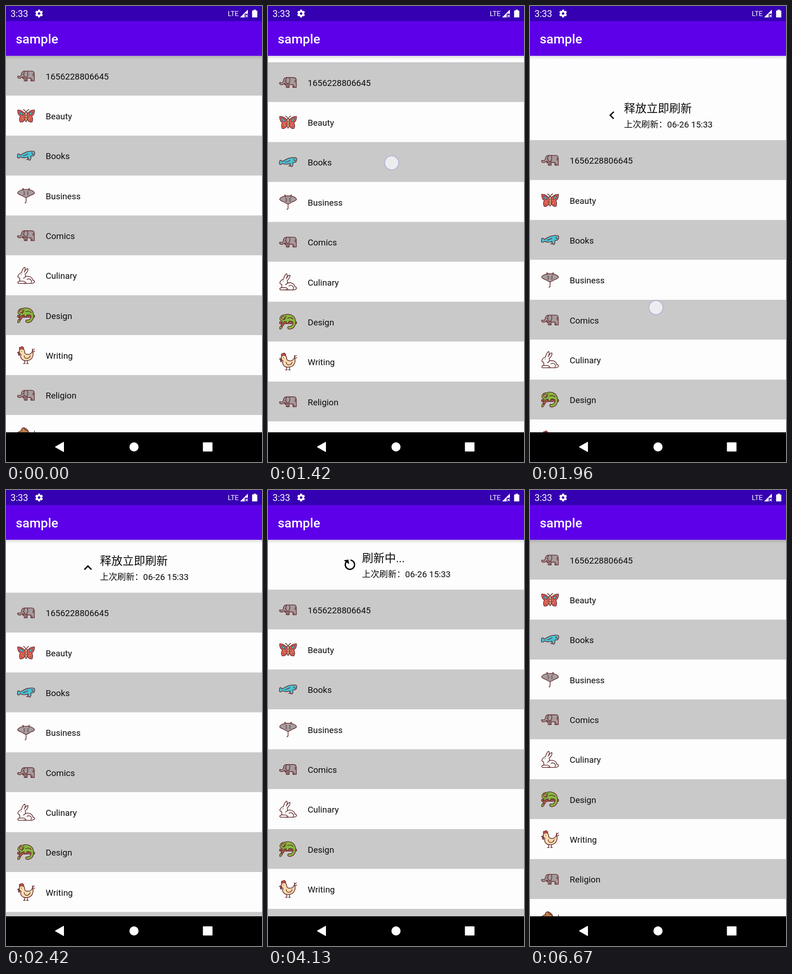
These frames come from a looping animation (561x998 px, 6.71 s). An HTML page:

```html
<!DOCTYPE html>
<html lang="zh-CN">
<head>
<meta charset="utf-8">
<title>sample</title>
<style>
  html, body { margin: 0; width: 100%; height: 100%; overflow: hidden; background: #fdfdfd; }
  svg { display: block; }
  text { font-family: Roboto, "Noto Sans CJK SC", "Noto Sans CJK", "Noto Sans CJK JP", sans-serif; fill: #0c0c0c; }
  .row, .sub { font-size: 18.93px; }
  .bar text { fill: #fff; }
  .pet { stroke: #6a3436; stroke-width: 1.6; stroke-linecap: round; stroke-linejoin: round; fill: none; }
</style>
</head>
<body>
<svg width="561" height="998" viewBox="0 0 561 998">
  <defs>
    <linearGradient id="shade" x2="0" y2="1">
      <stop stop-opacity=".13"/><stop offset="1" stop-opacity="0"/>
    </linearGradient>
    <g id="elephant" class="pet">
      <path fill="#a69b9e" d="M1.5 20.5c-1 5 5 5.500 8 3.500l2.500-2 1 2.500h3V31h6.500v-7c3 1.500 5 1.500 8 .5V31h7.500V16c0-4-2-6.500-6-6.500H17c-5 0-7 3-7.500 8-.3 3-3 4-5 3z"/>
      <path d="M17 10c-4 5-1 13 2 13 4 0 6-6 4-13M13 17v.5M33 31v-4M35.500 15v5M19.500 31v-7M14 22c-2 3-1 4 0 4"/>
    </g>
    <g id="butterfly" class="pet">
      <g id="wing">
        <path fill="#f0605a" d="M18.500 17C14 10 8 7 1.500 7.500c.5 6 1 11 6 13-2 4-2.500 9-.5 13 5 1 9-2 11.500-8z"/>
        <path fill="#43b6c6" stroke-width="1.100" d="M5.500 11c5 0 8 3 8.500 8-5 0-8-2-8.500-8z"/>
        <path fill="#f7a35c" stroke-width="1" d="M10 30c0-4 2-7 5-7.500-.5 4-2 6.500-5 7.500z"/>
        <path d="M19 12c-.5-3-2-5-5-5.500"/>
      </g>
      <use href="#wing" transform="matrix(-1 0 0 1 40 0)"/>
      <path fill="#fbdc9c" d="M18 14c0-3 4-3 4 0v12c0 3-1 6-2 7-1-1-2-4-2-7z"/>
      <path stroke-width="1" d="M18 19h4M18 24h4"/>
    </g>
    <g id="manatee" class="pet">
      <path fill="#46c3d4" d="M1.500 17c1-2 4-1 6 1.500 6-3 10-7 18-8 6-1 11-1.500 13 1 1 3 0 7-2 8.500-2 1-4 0-6 1 .5 4 0 8-2.500 9-3-1-4-4-4-7-6 2-12 2.500-16-.5-3 3-6 4-7 1 0-2 .5-4 .5-6.500z"/>
      <path d="M33 13v.5M36 17c-2 0-3-1-3-2.500M14 20c4-.5 7-2 10-4M24 23v5.500h-3"/>
    </g>
    <g id="ray" class="pet">
      <path d="M20 24v7c0 3 0 5-2.500 5"/>
      <path fill="#a69fa1" d="M13 4v3C8 8 3 10 1.500 14c1 4 8 4 11.500 7 3 2 5 3 7 3s4-1 7-3c3.500-3 10.500-3 11.500-7C37 10 32 8 27 7V4l-2 2.500H15z"/>
      <path d="M15 12h2M15 15h2M15 18h2M23 12h2M23 15h2M23 18h2M14 8.500v.5M26 8.500v.5"/>
    </g>
    <g id="rabbit" class="pet">
      <path fill="#fdfdfd" d="M10 14c1-6 4-11 7-12 2 3 1 7-1 11 2-4 5-8 8-8 1 4-2 9-6 12 1 3 1 5 0 6 7-3 16 0 17 8 4-1 5 5 1 5-1 1-2 1.500-4 1.500H4c-3 0-3-5 2-5 1-2 0-4 0-7-4-1-5-4-3-6 2-4 4-5 7-5.500z"/>
      <path d="M9 18v.5M18 23c-1 2-3 3-4 3M31 36c3-6-4-11-9-7M6 32.500h7c4 0 6 2 7 4.500h-5"/>
    </g>
    <g id="chameleon" class="pet">
      <path fill="#b95a42" d="M1.500 20h37v4H13c-3 2-4 5-6 7-3-1-3-4-1-7H1.500z"/>
      <path fill="#86bb3d" d="M2 13C3 8 7 4 12 5c9-4 22 0 24 11 2 10-2 19-12 20-6 0-6-5-2-6 6 1 9-3 9-9-3-3-6-3-9-2l-2 4h-4v-4l-5 1-2 3H6l1-5c-3 0-5-2-5-5z"/>
      <circle cx="9" cy="11" r="3" fill="#e3d66c"/>
      <path d="M9 11v.2M15 7c0 5-1 7-5 9M19 12c5-2 9-1 12 2"/>
      <path fill="#86bb3d" d="M6 29c-4 0-5 4-4 7 4 0 6-3 4-7z"/>
    </g>
    <g id="hen" class="pet">
      <path fill="#e2574f" d="M6 8C4 3 7 1 9 3c1-3 5-2 4 0 3 0 2 4 0 4z"/>
      <path fill="#f5b04c" d="M6 12l-5 2 4 2z"/>
      <path fill="#e2574f" d="M5 15c-3 2-2 6 1 5z"/>
      <path fill="#fbdcae" d="M5 12c0-4 2-6 6-6 5 0 6 4 6 8 1 4 4 4 8 4s8-3 9-8c4 11-1 22-14 22-9 0-14-7-11-14-3-1-4-3-4-6z"/>
      <path d="M10 11v.5M16 21c0 8 10 8 13 0M17 32v5.500M23 32v5.500M14 38h4M21 38h4M34 10l4-4M35 13l4-2M34 10V6"/>
    </g>
    <g id="dog" class="pet">
      <path fill="#bd8048" d="M2 14l7-4c1-4 3-7 7-6 3 1 7 3 9 8l3 8h8c3 0 3 5 1 8v9h-5v-7H18v7h-5V22l-6-2c-4 0-5-3-5-6z"/>
      <path d="M15 4l4 5 6 3M11 11v.5M37 20c2-3 2-6 1.500-9"/>
    </g>
  </defs>

  <rect width="561" height="998" fill="#fdfdfd"/>
  <g id="list">
    <g id="header">
      <g id="icon"><path id="glyph" transform="scale(1.456) translate(-12 -12)"/></g>
      <text id="status" x="206" y="-60.500" font-size="24.750"></text>
      <text class="sub" x="206" y="-27.500">上次刷新：06-26 15:33</text>
    </g>
  </g>

  <circle id="touch" r="15.500" fill="#ededef" stroke="#b3b5d3" stroke-width="2"/>

  <rect y="109" width="561" height="8" fill="url(#shade)"/>
  <g class="bar">
    <rect width="561" height="109" fill="#5d00e9"/>
    <rect width="561" height="33" fill="#3500b1"/>
    <text x="10" y="24" font-size="20">3:33</text>
    <g transform="translate(72.500 16.500)">
      <g id="teeth" fill="#fff"></g>
      <circle r="4.700" fill="none" stroke="#fff" stroke-width="3.800"/>
    </g>
    <text x="486" y="22" font-size="15.300">LTE</text>
    <path fill="#fff" d="M513 25L530 8v9h-7v8z"/>
    <path stroke="#fff" stroke-width="1.600" d="M524.500 19l5.500 5.500m0-5.500l-5.500 5.500"/>
    <path fill="#fff" d="M540 10h2.500V8h5v2h2.500q.7 0 .7.700v13.600q0 .7-.7.700h-10q-.7 0-.7-.7V10.700q0-.7.700-.7z"/>
    <text x="21.500" y="82" font-size="28.300" font-weight="500">sample</text>
  </g>
  <rect y="933" width="561" height="65"/>
  <g fill="#fff" stroke="#fff" stroke-width="2" stroke-linejoin="round">
    <path d="M108.500 965L126 955v20z"/>
    <circle cx="280.500" cy="965" r="9"/>
    <rect x="432.500" y="956" width="19" height="18"/>
  </g>
</svg>
<script>
const LOOP = 6710, TOP = 109, ROW = 87.35, HEADER = 109, PEAK = 196;
const ROWS = [
  ['elephant', '1656228806645'], ['butterfly', 'Beauty'], ['manatee', 'Books'],
  ['ray', 'Business'], ['elephant', 'Comics'], ['rabbit', 'Culinary'],
  ['chameleon', 'Design'], ['hen', 'Writing'], ['elephant', 'Religion'], ['dog', 'Feedback']
];
const GLYPHS = {
  arrow: 'M7.41 8.590L12 13.170l4.590-4.580L18 10l-6 6-6-6z',
  spin: 'M17.650 6.350A8 8 0 1 0 19.730 14h-2.080A6 6 0 1 1 16.220 7.780L13 11h7V4z',
  warn: 'M1.500 21h21L12 2.500zM13 18h-2v-2h2zM13 14h-2v-4h2z'
};
const $ = id => document.getElementById(id);
const list = $('list'), header = $('header'), icon = $('icon'), glyph = $('glyph');
const statusText = $('status'), touch = $('touch');
glyph.setAttribute('fill-rule', 'evenodd');

list.insertAdjacentHTML('beforeend', ROWS.map(([pet, name], i) => `
  <g transform="translate(0 ${i * ROW})">
    <rect width="561" height="${ROW}" fill="${i % 2 ? '#fdfdfd' : '#c9c9c9'}"/>
    <use href="#${pet}" x="24" y="24"/>
    <text class="row" x="87" y="51.700">${name}</text>
  </g>`).join(''));

for (let a = 0; a < 360; a += 60)
  $('teeth').insertAdjacentHTML('beforeend', `<rect x="-2.200" y="-8.500" width="4.400" height="4" transform="rotate(${a})"/>`);

// Cosine ease in and out between two times
const ease = (t, start, span) => {
  const x = Math.min(1, Math.max(0, (t - start) / span));
  return (1 - Math.cos(x * Math.PI)) / 2;
};

function pullAt(t) {
  if (t < 2150) return PEAK * ease(t, 1282, 804);
  return PEAK - (PEAK - HEADER) * ease(t, 2150, 330) - HEADER * ease(t, 5610, 400);
}

function stateAt(t) {
  if (t < 1860) return ['下拉可以刷新', 'arrow', 0];
  if (t < 2450) return ['释放立即刷新', 'arrow', 180 * ease(t, 1860, 200)];
  if (t < 5040) return ['刷新中...', 'spin', 260 + (t - 4130) * 0.36];
  return ['刷新失败', 'warn', 0];
}

function draw(now) {
  const t = now % LOOP, pull = pullAt(t);
  const [label, shape, angle] = stateAt(t);
  list.setAttribute('transform', `translate(0 ${TOP + pull})`);
  header.setAttribute('visibility', pull > 0 ? 'visible' : 'hidden');
  icon.setAttribute('transform', `translate(179.500 -54.500) rotate(${angle})`);
  glyph.setAttribute('d', GLYPHS[shape]);
  if (statusText.textContent !== label) statusText.textContent = label;

  touch.setAttribute('visibility', t > 1250 && t < 2150 ? 'visible' : 'hidden');
  touch.setAttribute('cx', 270.600 + pull * 0.0293);
  touch.setAttribute('cy', 317 + pull / 0.538);
}

const begin = performance.now();
function tick() {
  draw(performance.now() - begin);
  requestAnimationFrame(tick);
}
tick();
</script>
</body>
</html>
```
